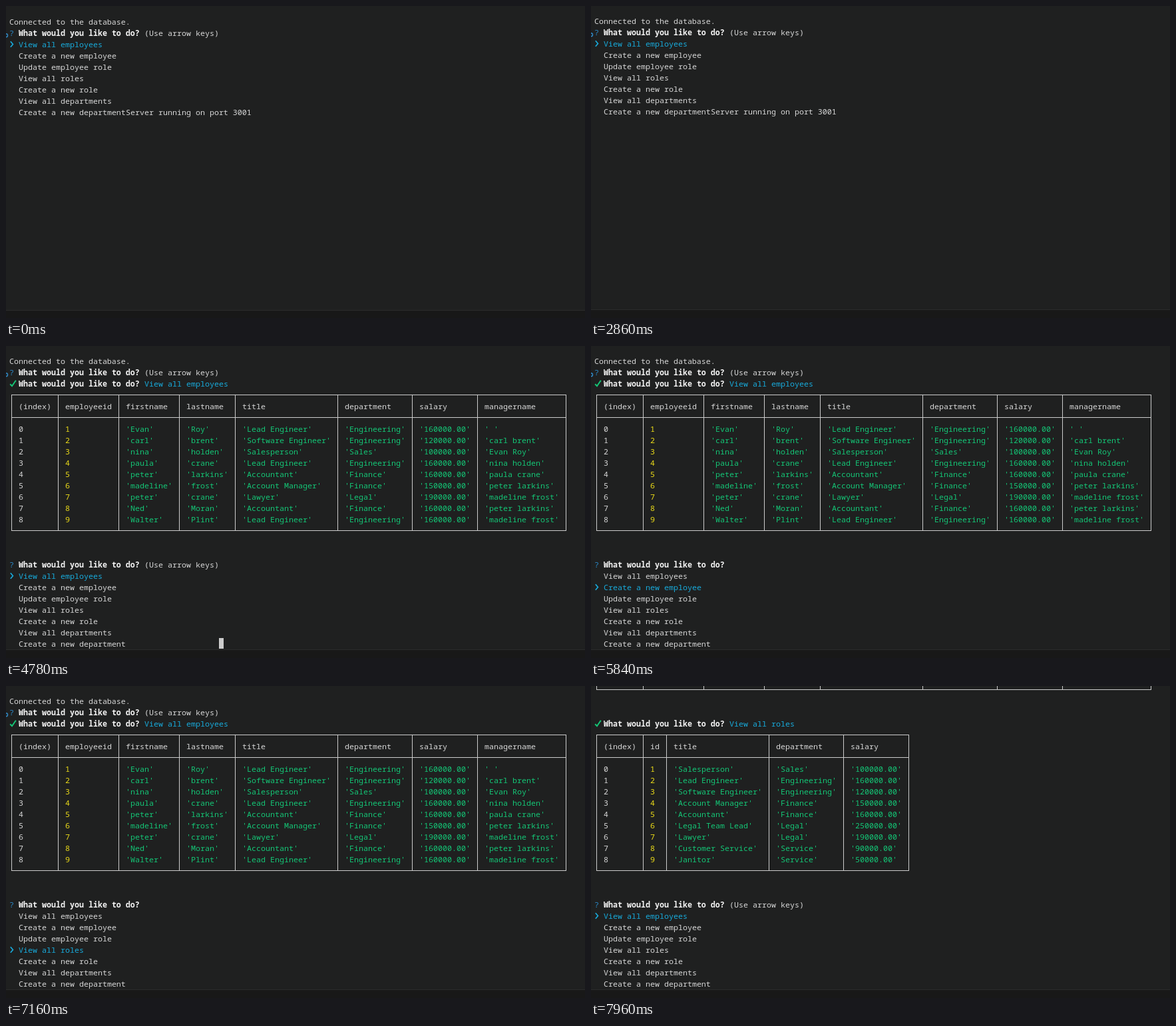
Write an HTML page that moves like this. It is 870 px wide and 469 px high and loops after 8 s.

```html
<!DOCTYPE html>
<html lang="en">
<head>
<meta charset="utf-8">
<title>Terminal session</title>
<style>
  html, body { margin: 0; width: 100%; height: 100%; overflow: hidden; background: #1f2020; }
  svg { display: block; width: 870px; height: 469px; }
  text { font-family: "Noto Sans Mono", "DejaVu Sans Mono", monospace; font-size: 11.667px; white-space: pre; }
</style>
</head>
<body>
<svg id="stage" viewBox="0 0 870 469" xmlns="http://www.w3.org/2000/svg"></svg>
<script>
const LOOP = 8000, CELL_W = 7, CELL_H = 17;
const COLOR = {
  bg: '#1f2020', fg: '#d8d8d8', bold: '#f4f4f4', line: '#cccccc', cyan: '#18abdc',
  blue: '#2b8aca', green: '#14c676', yellow: '#ecdc18'
};
const QUESTION = 'What would you like to do?';
const MENU = ['View all employees', 'Create a new employee', 'Update employee role',
  'View all roles', 'Create a new role', 'View all departments', 'Create a new department'];

const ROLES = [
  ['Salesperson', 'Sales', 100], ['Lead Engineer', 'Engineering', 160],
  ['Software Engineer', 'Engineering', 120], ['Account Manager', 'Finance', 150],
  ['Accountant', 'Finance', 160], ['Legal Team Lead', 'Legal', 250],
  ['Lawyer', 'Legal', 190], ['Customer Service', 'Service', 90], ['Janitor', 'Service', 50]
];
// first name, last name, role index, manager's row
const STAFF = [
  ['Evan', 'Roy', 1], ['carl', 'brent', 2, 1], ['nina', 'holden', 0, 0],
  ['paula', 'crane', 1, 2], ['peter', 'larkins', 4, 3], ['madeline', 'frost', 3, 4],
  ['peter', 'crane', 6, 5], ['Ned', 'Moran', 4, 4], ['Walter', 'Plint', 1, 5]
];

const quote = s => `'${s}'`;
const roleCells = ([title, dept, pay]) => [title, dept, `${pay}000.00`].map(quote);
const fullName = row => row === undefined ? ' ' : STAFF[row].slice(0, 2).join(' ');

const staffTable = [
  ['(index)', 'employeeid', 'firstname', 'lastname', 'title', 'department', 'salary', 'managername'],
  ...STAFF.map(([first, last, role, boss], i) =>
    [`${i}`, `${i + 1}`, quote(first), quote(last), ...roleCells(ROLES[role]), quote(fullName(boss))])
];
const roleTable = [
  ['(index)', 'id', 'title', 'department', 'salary'],
  ...ROLES.map((role, i) => [`${i}`, `${i + 1}`, ...roleCells(role)])
];

const colX = col => 5 + col * CELL_W;
const rowY = row => 14 + row * CELL_H;

const rect = (x, y, w, h, fill) =>
  `<rect x="${x}" y="${y}" width="${w}" height="${h}" fill="${fill}"/>`;

const print = (col, row, str, fill = COLOR.fg, weight = 500) =>
  `<text x="${colX(col)}" y="${rowY(row) + 13}" fill="${fill}" font-weight="${weight}">${str}</text>`;

const cursor = (col, row) => rect(colX(col), rowY(row), CELL_W, CELL_H - 1, COLOR.line);

const glyph = (row, d, color, width) =>
  `<path transform="translate(5 ${rowY(row)})" d="${d}" fill="none" stroke="${color}" stroke-width="${width}"/>`;
const pointer = row => glyph(row, 'M1.8 4.2L5.4 8.5L1.8 12.8', COLOR.cyan, 1.7);
const tick = row => glyph(row, 'M1.2 9.2L4 12.2L9.8 3.8', COLOR.green, 2);

const ask = (row, hint = true) =>
  print(0, row, '?', COLOR.blue) + print(2, row, QUESTION, COLOR.bold, 700) +
  (hint ? print(29, row, '(Use arrow keys)') : '');

const answer = (row, choice) =>
  tick(row) + print(2, row, QUESTION, COLOR.bold, 700) + print(29, row, choice, COLOR.cyan);

const menu = (row, active) => MENU.map((item, i) =>
  print(2, row + i, item, i === active ? COLOR.cyan : COLOR.fg)).join('') + pointer(row + active);

function table(top, rows) {
  const bottom = top + rows.length + 2;
  const edges = [0];
  rows[0].forEach((_, c) =>
    edges.push(edges[c] + 3 + Math.max(...rows.map(cells => cells[c].length))));
  const x0 = colX(0) + 3, y0 = rowY(top) + 8;
  const width = edges.at(-1) * CELL_W + 1;
  let out = '';
  for (const r of [top, top + 2, bottom]) out += rect(x0, rowY(r) + 8, width, 1, COLOR.line);
  for (const c of edges) out += rect(colX(c) + 3, y0, 1, (bottom - top) * CELL_H + 1, COLOR.line);
  rows.forEach((cells, r) => cells.forEach((cell, c) => {
    const fill = !r || !c ? COLOR.fg : c === 1 ? COLOR.yellow : COLOR.green;
    out += print(edges[c] + 2, top + r + (r ? 2 : 1), cell, fill);
  }));
  return out;
}

const intro = print(0, 0, 'Connected to the database.') + ask(1) +
  '<circle cx="0" cy="43.2" r="2.5" fill="none" stroke="#2f86c2" stroke-width="1.5"/>';
const start = intro + menu(2, 0) + print(25, 8, 'Server running on port 3001');
const chosen = intro + answer(2, MENU[0]);
const staff = chosen + table(3, staffTable);
const roles = staff + answer(18, MENU[3]) + table(19, roleTable);
const browse = active => staff + ask(18, false) + menu(19, active);

// start time, content, rows scrolled, vertical offset
const SCENES = [
  [0, start, 0, 1],
  [1530, start, 0, 0],
  [4720, chosen + cursor(0, 3), 0, 0],
  [4780, staff + ask(18) + menu(19, 0) + cursor(45, 25), 0, 0],
  [5840, browse(1), 0, 0],
  [7030, browse(2), 0, 0],
  [7160, browse(3), 0, 0],
  [7900, roles + ask(34) + cursor(0, 34) + print(0, 34, '?', COLOR.bg), 9, 0],
  [7960, roles + ask(34) + menu(35, 0), 16, 0]
];

const stage = document.getElementById('stage');
let shown;

function draw(time) {
  const scene = SCENES.findLast(([from]) => time >= from);
  if (scene === shown) return;
  shown = scene;
  const [, content, scroll, offset] = scene;
  stage.innerHTML = rect(0, 0, 870, 469, COLOR.bg) +
    `<g transform="translate(0 ${offset - scroll * CELL_H})">${content}</g>` +
    rect(0, 456 + offset, 870, 13, '#181818') + rect(0, 456 + offset, 870, 1, '#2b2b2b');
}

const begin = performance.now();
function animate() {
  draw((performance.now() - begin) % LOOP);
  requestAnimationFrame(animate);
}
animate();
</script>
</body>
</html>
```
